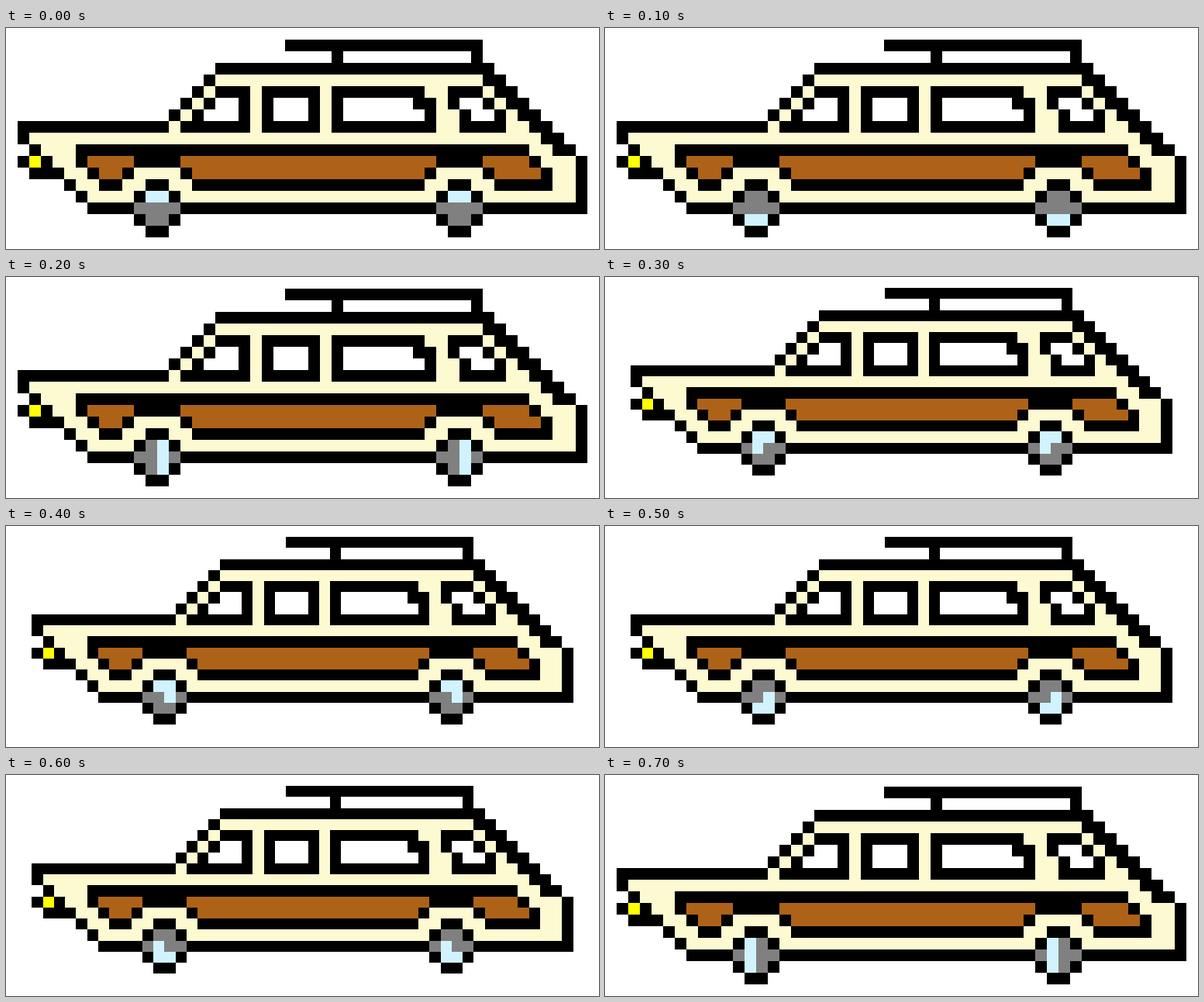
An HTML page with a canvas that plays this animation: 765x285 px, repeating every 0.8 s.

```html
<!DOCTYPE html>
<html lang="en">
<head>
<meta charset="utf-8">
<title>Station wagon</title>
<style>
html, body { margin: 0; width: 100%; height: 100%; overflow: hidden; background: #fff; }
canvas { display: block; }
</style>
</head>
<body>
<canvas id="stage" width="765" height="285"></canvas>
<script>
const ctx = document.getElementById('stage').getContext('2d');
const BLACK = '#000', WHITE = '#fff', CREAM = '#fdfad1', WOOD = '#ad6217',
      GRAY = '#808080', SHINE = '#d0f3ff', YELLOW = '#ff0';

// Hubcap highlights: x, y, w, h within the wheel
const UPPER = [1, 1, 2, 1], LOWER = [1, 3, 2, 1], LEFT = [1, 1, 1, 3], RIGHT = [2, 1, 1, 3];
const MID_LEFT = [1, 2, 1, 1], MID_RIGHT = [2, 2, 1, 1];
const shines = [
  [UPPER], [LOWER], [RIGHT],
  [UPPER, MID_LEFT], [UPPER, MID_RIGHT], [LOWER, MID_RIGHT], [LOWER, MID_LEFT],
  [LEFT]
];

let cell, originX;
const snap = v => Math.ceil(v - 0.5);

// Fill a box measured in art pixels, snapped to whole screen pixels
function box(color, x, y, w, h = 1) {
  const x0 = snap(originX + x * cell), y0 = snap(y * cell);
  ctx.fillStyle = color;
  ctx.fillRect(x0, y0, snap(originX + (x + w) * cell) - x0, snap((y + h) * cell) - y0);
}

function body() {
  for (let y = 4; y < 15; y++) {
    const start = y < 8 ? 21 - y : Math.max(1, y - 8);
    const end = y < 11 ? y + 37 : 49;
    box(CREAM, start, y, end - start);
    box(BLACK, start, y, 1);
    box(BLACK, end, y, y < 11 ? 2 : 1);
  }
  // roof and rack
  box(BLACK, 24, 1, 17);
  box(BLACK, 28, 2, 1);
  box(BLACK, 40, 2, 1);
  box(BLACK, 18, 3, 24);
  // hood, headlight and sill
  box(BLACK, 1, 8, 13);
  box(BLACK, 1, 11, 3);
  box(YELLOW, 2, 11, 1);
  box(BLACK, 2, 12, 3);
  box(BLACK, 7, 15, 43);
}

function windows() {
  for (let y = 5; y < 9; y++) box(BLACK, 23 - y, y, y - 2);
  for (let y = 6; y < 8; y++) box(WHITE, 24 - y, y, y - 4);

  box(BLACK, 22, 5, 5, 4);
  box(WHITE, 23, 6, 3, 2);

  box(BLACK, 28, 5, 8, 4);
  box(BLACK, 36, 6, 1, 3);
  box(WHITE, 29, 6, 6);
  box(WHITE, 29, 7, 7);

  box(BLACK, 38, 5, 3);
  box(BLACK, 38, 6, 4);
  box(BLACK, 39, 7, 4, 2);
  box(WHITE, 39, 6, 2);
  box(WHITE, 40, 7, 2);
}

function panels() {
  box(BLACK, 6, 10, 39);
  box(BLACK, 6, 11, 40);
  box(WOOD, 7, 11, 4);
  box(WOOD, 15, 11, 22);
  box(WOOD, 41, 11, 4);

  box(BLACK, 7, 12, 4);
  box(WOOD, 8, 12, 2);
  box(BLACK, 15, 12, 22);
  box(WOOD, 16, 12, 20);
  box(BLACK, 41, 12, 6);
  box(WOOD, 42, 12, 4);

  box(BLACK, 8, 13, 2);
  box(BLACK, 16, 13, 20);
  box(BLACK, 42, 13, 5);
}

function wheel(x, shine) {
  box(BLACK, x + 1, 13, 2, 5);
  box(BLACK, x, 14, 4, 3);
  box(GRAY, x + 1, 14, 2, 3);
  box(GRAY, x, 15, 4);
  for (const [dx, dy, w, h] of shine) box(SHINE, x + dx, 13 + dy, w, h);
}

function draw(ms) {
  const step = Math.floor(ms / 100) % 8;
  const scale = step > 2 && step < 7 ? 0.95 : 1;
  cell = 15 * scale;
  originX = 765 * (1 - scale) / 2;

  ctx.fillStyle = WHITE;
  ctx.fillRect(0, 0, 765, 285);
  body();
  windows();
  panels();
  wheel(11, shines[step]);
  wheel(37, shines[step]);
}

const begin = performance.now();
function tick() {
  draw(performance.now() - begin);
  requestAnimationFrame(tick);
}
tick();
</script>
</body>
</html>
```
